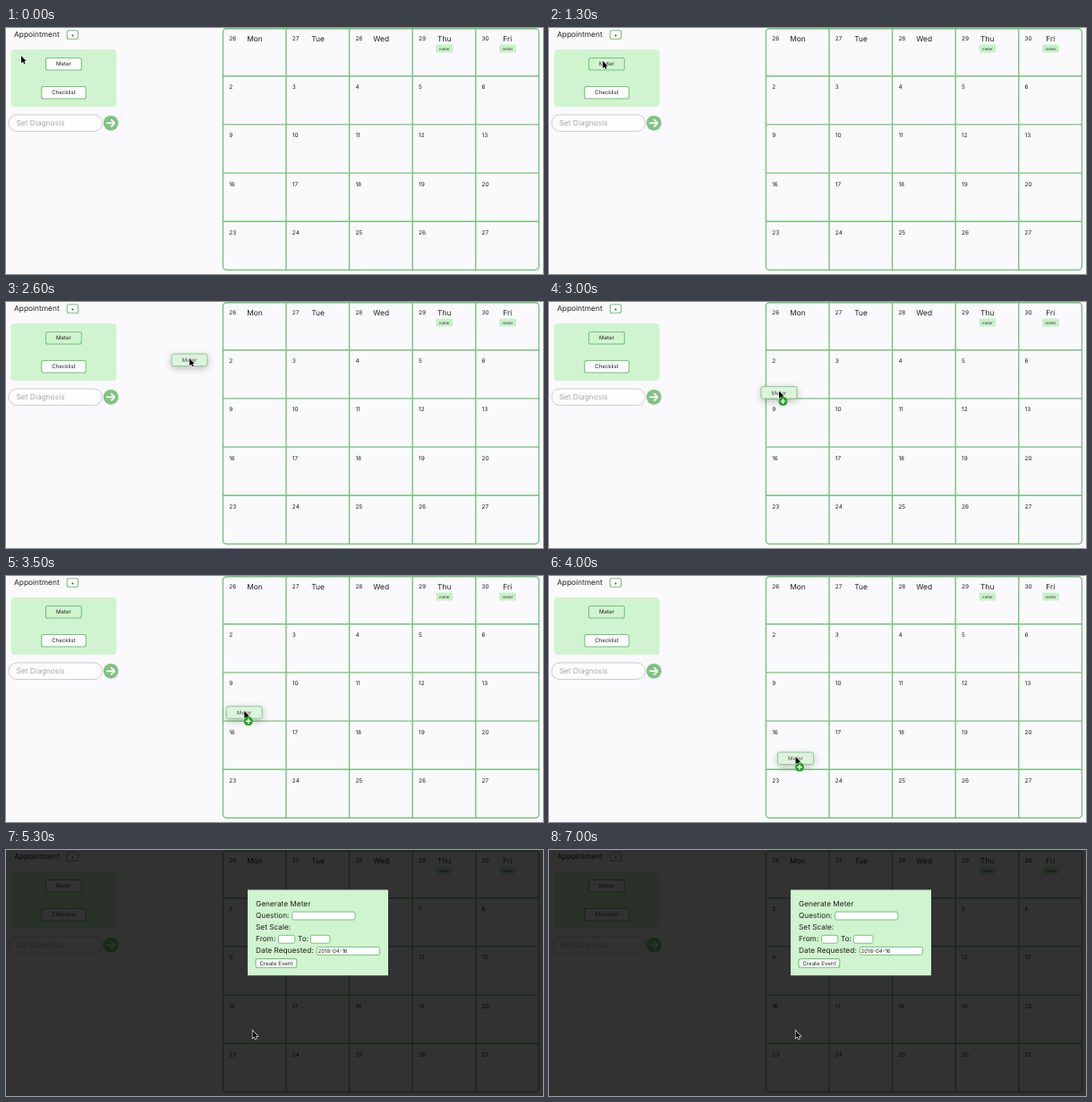
Write an HTML page with a canvas that moves like this. It is 600 px wide and 275 px high and loops after 7200 ms.

```html
<!DOCTYPE html>
<html lang="en">
<head>
<meta charset="utf-8">
<title>Appointment calendar</title>
<style>
  html, body { margin: 0; width: 100%; height: 100%; overflow: hidden; background: #fafafc; }
  canvas { display: block; width: 600px; height: 275px; }
</style>
</head>
<body>
<canvas id="stage"></canvas>
<script>
const W = 600, H = 275, LOOP = 7200, STEP = 100;
const GREEN = '#78c17c', PALE = '#d0f4cf', INK = '#222';
const DRAG_AT = 1700, MODAL_AT = 5300;
const GRID = { x: 242.4, y: -0.5, w: 70.6, h: 54.2, n: 5 };

const canvas = document.getElementById('stage');
const ctx = canvas.getContext('2d');
const ratio = window.devicePixelRatio || 1;
canvas.width = W * ratio;
canvas.height = H * ratio;
ctx.textRendering = 'geometricPrecision';

// pointer key points: time, x, y
const path = [
  [0, 17, 31], [800, 54, 35], [900, 54, 35], [1700, 66, 38.5],
  [2200, 138, 43.5], [2500, 192, 54], [3000, 257, 99.5], [4000, 275.5, 202]
];

function pointerAt(t) {
  const i = path.findIndex(p => p[0] > t);
  if (i < 0) return path[path.length - 1].slice(1);
  const a = path[i - 1], b = path[i];
  const k = (t - a[0]) / (b[0] - a[0]);
  return [1, 2].map(j => a[j] + (b[j] - a[j]) * k);
}

function box(x, y, w, h, r, fill, stroke, line = 1) {
  ctx.beginPath();
  ctx.roundRect(x, y, w, h, r);
  if (fill) { ctx.fillStyle = fill; ctx.fill(); }
  if (stroke) { ctx.strokeStyle = stroke; ctx.lineWidth = line; ctx.stroke(); }
}

function disc(x, y, r, fill) {
  ctx.beginPath();
  ctx.arc(x, y, r, 0, Math.PI * 2);
  ctx.fillStyle = fill;
  ctx.fill();
}

function text(str, x, y, size, color = INK, align = 'left') {
  ctx.font = `${size}px Inter, sans-serif`;
  ctx.textAlign = align;
  ctx.fillStyle = color;
  ctx.fillText(str, x, y);
}

function line(color, width, x1, y1, x2, y2) {
  ctx.beginPath();
  ctx.moveTo(x1, y1);
  ctx.lineTo(x2, y2);
  ctx.strokeStyle = color;
  ctx.lineWidth = width;
  ctx.stroke();
}

function button(label, x, y, w, h, fill = '#fbfdfb') {
  box(x, y, w, h, 2, fill, GREEN, 1.1);
  text(label, x + w / 2, y + h / 2 + 2.2, 6.1, INK, 'center');
}

function drawSidebar(hovered) {
  text('Appointment', 9, 10, 8.4);
  button('+', 68.2, 2.7, 12.4, 9.6);
  box(5.5, 24, 118, 64, 4, PALE);
  button('Meter', 44.5, 33.5, 39.8, 13.5, hovered ? PALE : undefined);
  button('Checklist', 39.7, 65.5, 49.6, 13.5);
  box(3, 97, 104.5, 18.5, 9.2, '#fdfdfe', '#cdcdcf');
  text('Set Diagnosis', 11.5, 109.4, 8.4, '#a9a9ad');

  const x = 117.2, y = 106.3;
  disc(x, y, 8.4, '#80c283');
  line('#fff', 1.8, x - 5, y, x + 4, y);
  for (const side of [-4.2, 4.2]) line('#fff', 1.8, x, y + side, x + 4.4, y);
}

function drawCalendar() {
  const { x, y, w, h, n } = GRID;
  const top = 0.7, right = x + w * n, bottom = y + h * n;
  box(x, top, right - x, bottom - top, 4, null, GREEN, 1.4);
  for (let i = 1; i < n; i++) {
    line(GREEN, 1.4, x + w * i, top, x + w * i, bottom);
    line(GREEN, 1.4, x, y + h * i, right, y + h * i);
  }

  ['Mon', 'Tue', 'Wed', 'Thu', 'Fri'].forEach((day, c) => {
    const left = x + w * c, mid = left + 35.5;
    text(day, mid, 15.4, 8.4, INK, 'center');
    for (let r = 0; r < n; r++) {
      const date = r ? 7 * r - 5 + c : 26 + c;
      text(String(date), left + 6.8, 14 + h * r, 6.5);
    }
    if (c > 2) {
      box(mid - 9.2, 18.5, 18.8, 9, 1.5, '#c8f0c8');
      text('meter', mid + 0.2, 24.6, 4.4, '#333', 'center');
    }
  });
}

function drawGhost(x, y) {
  ctx.save();
  ctx.shadowColor = 'rgba(0,0,0,0.27)';
  ctx.shadowBlur = 8 * ratio;
  ctx.shadowOffsetY = 2.5 * ratio;
  box(x, y, 40, 13.5, 2, '#dcf4dc');
  ctx.restore();
  box(x, y, 40, 13.5, 2, null, '#8dca90');
  text('Meter', x + 20, y + 9, 6.1, '#555', 'center');
}

function drawBadge(x, y) {
  disc(x, y, 5, '#26a022');
  line('#fff', 1.5, x - 2.8, y, x + 2.8, y);
  line('#fff', 1.5, x, y - 2.8, x, y + 2.8);
}

function drawPointer(x, y) {
  const shape = [[0, 0], [0, 8.2], [1.9, 6.5], [3.2, 9.2], [4.5, 8.6], [3.4, 6], [5.7, 5.9]];
  ctx.beginPath();
  shape.forEach(([dx, dy]) => ctx.lineTo(x + dx, y + dy));
  ctx.closePath();
  ctx.strokeStyle = '#fff';
  ctx.lineWidth = 1.2;
  ctx.stroke();
  ctx.fillStyle = '#000';
  ctx.fill();
}

function drawModal() {
  ctx.fillStyle = 'rgba(0,0,0,0.8)';
  ctx.fillRect(0, 0, W, H);
  box(270, 44.5, 157, 95.7, 0, PALE);

  const left = 279, rowY = row => 63 + row * 13.1;
  const label = (str, row, x = left) => text(str, x, rowY(row), 8.3);
  const field = (x, w, row) => box(x, rowY(row) - 7, w, 8.9, 2, '#fff', GREEN);
  label('Generate Meter', 0);
  label('Question:', 1);
  field(319.6, 70.4, 1);
  label('Set Scale:', 2);
  label('From:', 3);
  field(304.4, 18.4, 3);
  label('To:', 3, 326);
  field(340.4, 21.6, 3);
  label('Date Requested:', 4);
  field(347.2, 70.4, 4);
  text('2018-04-16', 348.6, rowY(4) - 0.3, 6);
  button('Create Event', left, rowY(5) - 6.9, 45.8, 9.6, '#fff');
}

function draw(t) {
  const [x, y] = pointerAt(t);
  const modal = t >= MODAL_AT;
  ctx.setTransform(ratio, 0, 0, ratio, 0, 0);
  ctx.fillStyle = '#fafafc';
  ctx.fillRect(0, 0, W, H);
  drawSidebar(x > 45 && !modal);
  drawCalendar();
  if (modal) drawModal();
  else if (t >= DRAG_AT) drawGhost(x - 20, y - 5);
  drawPointer(x, y);
  if (!modal && x > GRID.x) drawBadge(x + 4.5, y + 11.6);
}

const start = performance.now();
function tick() {
  const t = (performance.now() - start) % LOOP;
  draw(Math.floor(t / STEP) * STEP);
  requestAnimationFrame(tick);
}
tick();
</script>
</body>
</html>
```
